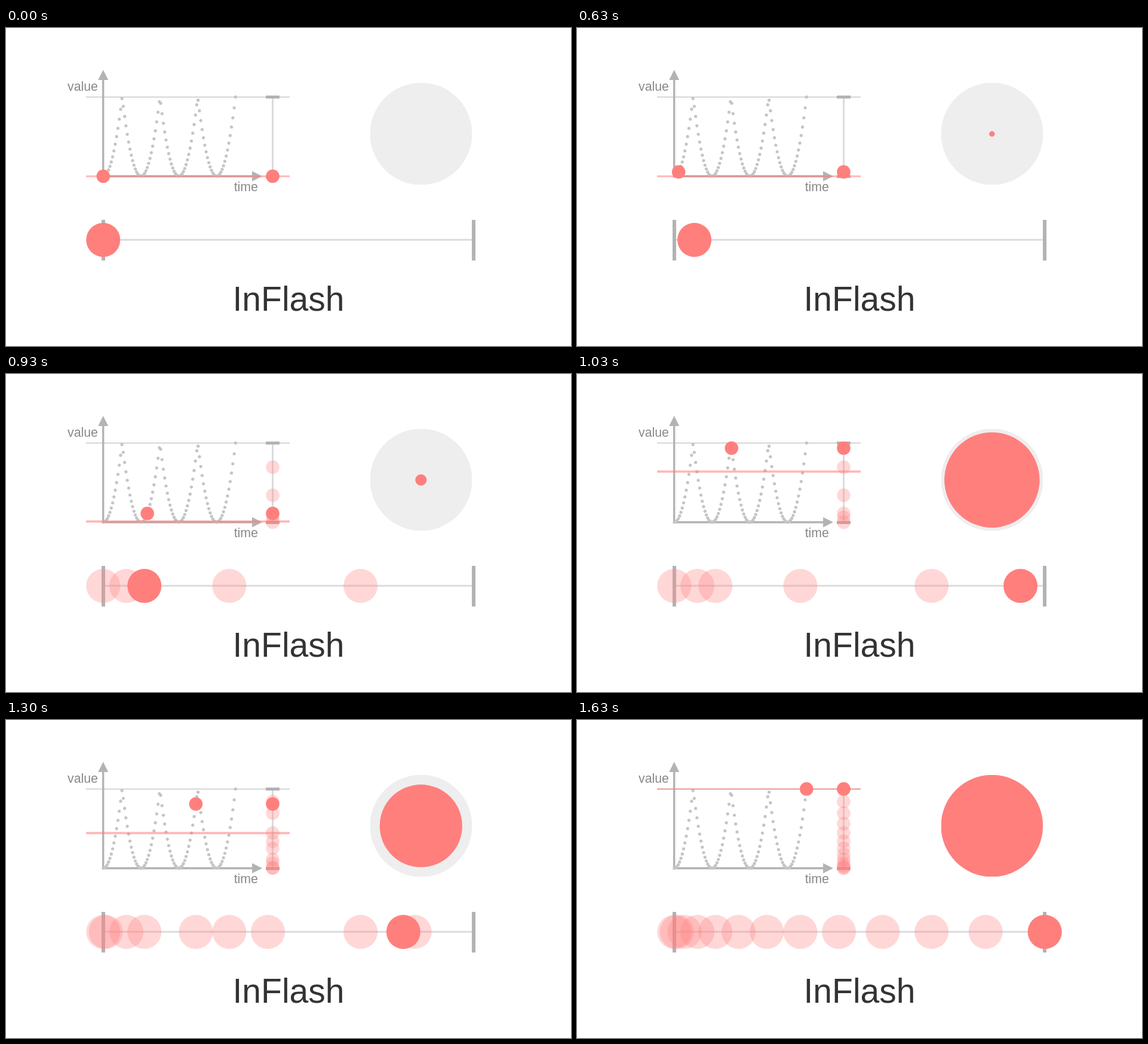
An HTML page for the animation above (2.91 s loop, 946 px wide and 532 px high).

```html
<!DOCTYPE html>
<html lang="en">
<head>
<meta charset="utf-8">
<title>InFlash easing</title>
<style>
  html, body { margin: 0; width: 100%; height: 100%; overflow: hidden; background: #fff; }
  svg { display: block; width: 946px; height: 532px; }
  text { font-family: "Liberation Sans", Arial, sans-serif; }
  .label { font-size: 21.3px; fill: #888; }
  .dark { fill: #b3b3b3; }
  .pale { fill: #dcdcdc; }
  .red { fill: #ff7f7d; }
</style>
</head>
<body>
<svg viewBox="0 0 946 532">
  <clipPath id="disc"><rect x="610" y="92" width="170" height="170"/></clipPath>

  <!-- graph -->
  <rect class="dark" x="134" y="115" width="341" height="1"/>
  <rect class="pale" x="445" y="115" width="3" height="133"/>
  <rect class="dark" x="435" y="113" width="23" height="5"/>
  <rect class="dark" x="435" y="246" width="23" height="5"/>
  <path class="dark" d="M161 86h3.4v160.3H413v3.4H161z"/>
  <path class="dark" d="M162.7 70l8.5 17h-17zM429 248l-17 8.5v-17z"/>
  <text class="label" x="103" y="105">value</text>
  <text class="label" x="381.7" y="273">time</text>
  <g id="dots" fill="#c5c5c5"></g>
  <rect id="level" class="red" x="134" width="341" opacity=".55"/>

  <!-- track -->
  <rect class="pale" x="163" y="352.8" width="620" height="3"/>
  <rect class="dark" x="160" y="321" width="6" height="68"/>
  <rect class="dark" x="780" y="321" width="6" height="68"/>
  <g id="ghosts" class="red" fill-opacity=".31"></g>

  <!-- scaled disc -->
  <g clip-path="url(#disc)">
    <circle cx="695" cy="177" r="85.5" fill="#eee"/>
    <circle id="scaled" class="red" cx="694.8" cy="177.2"/>
  </g>

  <circle id="plotBall" class="red" r="11.3"/>
  <circle id="barBall" class="red" cx="446.5" r="11.3"/>
  <circle id="trackBall" class="red" cy="354.5" r="28.5"/>
  <text x="473" y="472.5" font-size="57" text-anchor="middle" fill="#333">InFlash</text>
</svg>
<script>
const LOOP = 2910, START = 630, FRAMES = 30, FLASHES = 7, GHOSTS = 12, DOTS = 99;
const $ = id => document.getElementById(id);

// squared triangle wave
function flash(p) {
  const m = (p * FLASHES) % 2;
  const r = m <= 1 ? m : 2 - m;
  return r * r;
}

const plotX = p => 162.8 + 221.5 * p;
const plotY = v => 248 - 132.6 * v;
const trackX = v => 162.8 + 620.4 * v;

function set(el, attrs) {
  for (const k in attrs) el.setAttribute(k, attrs[k]);
  return el;
}
function circle(parent, cx, cy, r) {
  const el = document.createElementNS("http://www.w3.org/2000/svg", "circle");
  parent.appendChild(set(el, { cx, cy, r }));
  return el;
}

for (let i = 0; i <= DOTS; i++) {
  const p = i / DOTS;
  circle($("dots"), plotX(p), plotY(flash(p)), 2.6);
}

const ghosts = [];
for (let i = 0; i <= GHOSTS; i++) {
  const p = i / GHOSTS, v = flash(p);
  ghosts.push({ p, els: [
    circle($("ghosts"), trackX(v), 354.5, 28.5),
    circle($("ghosts"), 446.5, plotY(v), 11.3)
  ] });
}

function draw(time) {
  const t = Math.floor((time % LOOP) / 10) * 10;
  const n = t < START ? 0 : Math.min(FRAMES + 1, Math.floor((t - START) * 3 / 100) + 1);
  const p = Math.min(n / FRAMES, 1);
  const v = flash(p);

  // the level line and the ghosts trail by one step
  const q = Math.max(n - 1, 0) / FRAMES;
  const lv = flash(q);
  const h = lv === 1 ? 2.6 : lv === 0 ? 3 : 3.8;

  set($("level"), { y: plotY(lv) + 0.1 - h / 2, height: h });
  set($("plotBall"), { cx: plotX(p), cy: plotY(v) });
  set($("barBall"), { cy: plotY(v) });
  set($("trackBall"), { cx: trackX(v) });
  set($("scaled"), { r: 85.3 * v });
  for (const g of ghosts) {
    const on = n > 1 && g.p <= q + 1e-6;
    for (const el of g.els) el.style.display = on ? "" : "none";
  }
}

function tick() {
  draw(performance.now());
  requestAnimationFrame(tick);
}
tick();
</script>
</body>
</html>
```
